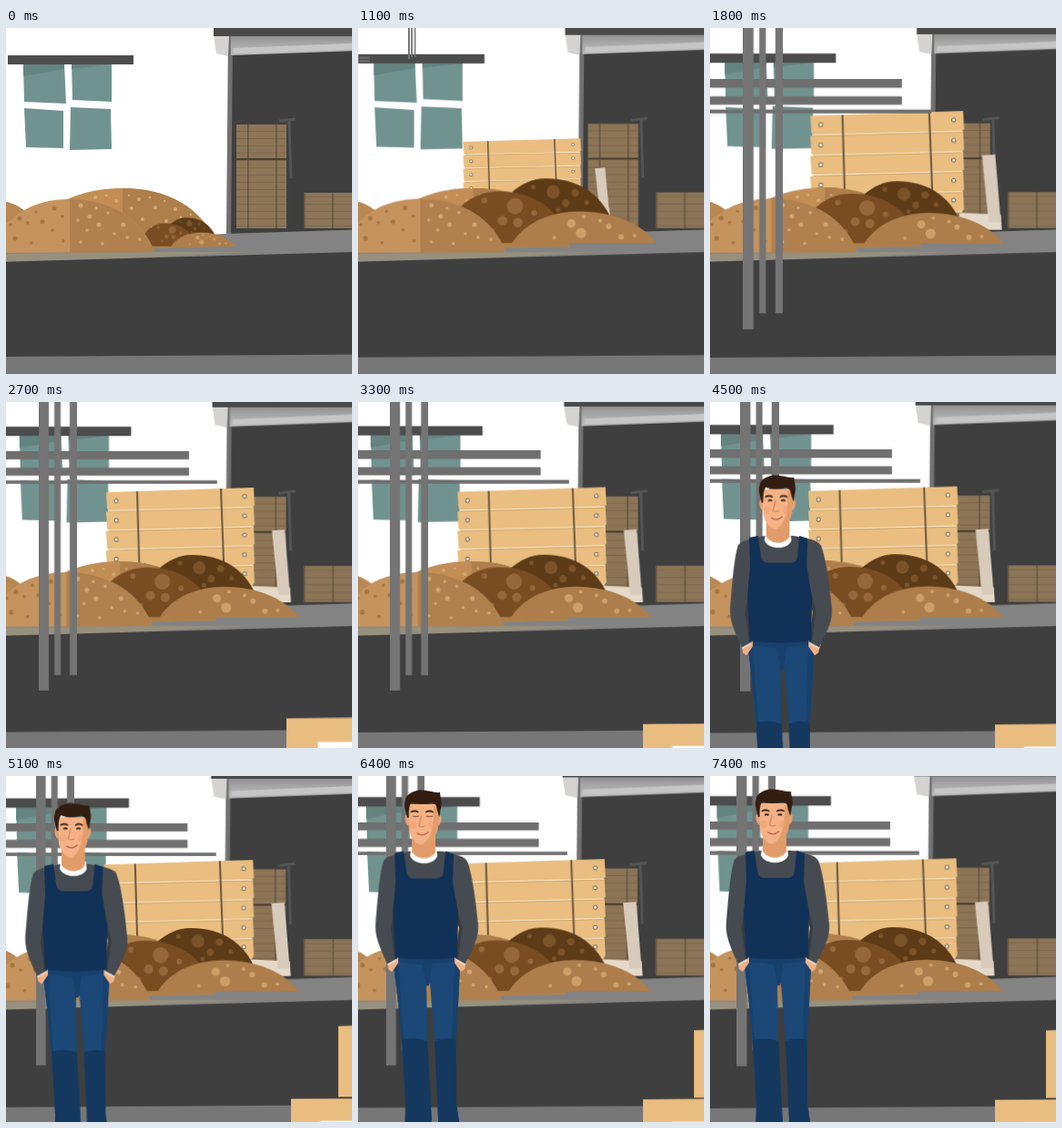
These frames come from a looping animation (380x380 px, 7.5 s). An HTML page without scripts:

```html
<!DOCTYPE html>
<html lang="en">
<head>
<meta charset="utf-8">
<title>Warehouse yard</title>
<style>
html, body { margin: 0; width: 100%; height: 100%; overflow: hidden; background: #fff; }
svg { display: block; width: 100vw; height: 100vh; }
.dots { fill: none; stroke-linecap: round; }
.anim { animation: 7.5s linear infinite; }
.zoom { transform-origin: 340px 250px; animation-name: zoom; }
.heaps { transform-origin: 190px 243px; animation-name: heaps; }
.planks { transform-origin: 129px 182px; animation-name: planks; }
.posts { transform-origin: 57px 0; animation-name: posts; }
.rails { transform-origin: 0 24px; animation-name: rails; }
.box1 { transform-origin: 376px 429px; animation-name: box1; }
.box2 { transform-origin: 430px 353px; animation-name: box2; }
.man { animation-name: rise; }
.open { animation-name: open; }
.shut { animation-name: shut; }
@keyframes zoom { to { transform: scale(1.0365); } }
@keyframes heaps {
  0% { transform: scale(.47); animation-timing-function: ease-out; }
  8% { transform: scale(1.08); animation-timing-function: ease-in-out; }
  14.67% { transform: scale(1.045); }
  24%, 100% { transform: none; }
}
@keyframes planks {
  0%, 12% { transform: scale(0); }
  14.67% { transform: scale(.8, .7); animation-timing-function: ease-out; }
  20% { transform: scale(1.06); animation-timing-function: ease-in-out; }
  30%, 100% { transform: none; }
}
@keyframes posts {
  0%, 13% { transform: scale(0); }
  14.67% { transform: scale(.2, .1); animation-timing-function: ease-out; }
  22% { transform: scale(1.05); animation-timing-function: ease-in-out; }
  32%, 100% { transform: none; }
}
@keyframes rails {
  0%, 13% { transform: scale(0); }
  14.67% { transform: scale(.05, .2); animation-timing-function: ease-out; }
  22% { transform: scale(1.05); animation-timing-function: ease-in-out; }
  32%, 100% { transform: none; }
}
@keyframes box1 {
  0%, 30.7% { transform: scale(0); animation-timing-function: ease-out; }
  36% { transform: scale(1.08); animation-timing-function: ease-in-out; }
  44%, 100% { transform: none; }
}
@keyframes box2 {
  0%, 62.7% { transform: scale(0); animation-timing-function: ease-out; }
  68% { transform: scale(1.06); animation-timing-function: ease-in-out; }
  75%, 100% { transform: none; }
}
@keyframes rise {
  0%, 44% { transform: translateY(382px); animation-timing-function: cubic-bezier(.333, 1, .667, 1); }
  79.6%, 100% { transform: none; }
}
@keyframes open { 0%, 84.5%, 87%, 100% { opacity: 1; } 84.6%, 86.9% { opacity: 0; } }
@keyframes shut { 0%, 84.5%, 87%, 100% { opacity: 0; } 84.6%, 86.9% { opacity: 1; } }
</style>
</head>
<body>
<svg viewBox="0 0 380 380" preserveAspectRatio="none">
<defs>
  <linearGradient id="eave" x2="0" y2="1">
    <stop offset="0" stop-color="#8e8e8e"/><stop offset=".4" stop-color="#a6a6a6"/><stop offset="1" stop-color="#bcbcbc"/>
  </linearGradient>
  <pattern id="crate" width="31" height="8" x="265" y="106" patternUnits="userSpaceOnUse">
    <path fill="#8c7557" d="M0 0h31v8H0z"/>
    <path fill="none" stroke="#79644a" stroke-width=".8" d="M0 7.5h31"/>
    <path fill="none" stroke="#66563f" stroke-width="1.6" d="M.8 0v8"/>
  </pattern>
  <g id="plank">
    <path fill="#e9be80" d="M110 99L272 94L273 113L270 117L113 120L111 117Z"/>
    <path fill="none" stroke="#f8e8cb" stroke-width="1.2" d="M112 119.5L271 115.5"/>
    <path fill="none" stroke="#c99a5c" stroke-width=".7" d="M113 120.4L270 116.6"/>
    <g fill="#fff" stroke="#80684a"><circle cx="121" cy="108.500" r="2"/><circle cx="262" cy="103.500" r="2"/></g>
  </g>
  <path id="mound" d="M-23 247C0 205 30 188 70 188C115 188 150 210 163 246Z"/>
  <path id="back" d="M40 204C70 182 100 176 128 176C175 176 215 195 233 240L40 244Z"/>
  <clipPath id="right"><path d="M70 170H180V250H70z"/></clipPath>
  <clipPath id="rightBack"><path d="M128 170H250V250H128z"/></clipPath>
</defs>

<g class="anim zoom">
  <!-- window -->
  <g fill="#71938f">
    <path d="M19 39H64L66 83L20 81Z"/><path d="M72 39H116V81L73 79Z"/>
    <path d="M20 88L63 91V132L22 131Z"/><path d="M71 87L115 89L116 133L70 134Z"/>
  </g>
  <path fill="#648480" d="M19 40H64V45L19 53ZM72 40H114L72 45Z"/>
  <path fill="#4c4c4c" d="M2 30H140V40H2Z"/>

  <!-- storehouse -->
  <path fill="#3f3f3f" d="M246 20H400V228H246Z"/>
  <path fill="#717171" d="M244 9H249L247 227H242Z"/>
  <path fill="#d5d3d1" d="M228 8H245L244 31L231 28Z"/>
  <path fill="url(#eave)" d="M247 8H400V24.500L247 30Z"/>
  <path fill="#c6c6c6" d="M250 22L400 16V23L250 28Z"/>
  <path fill="#494949" d="M228 -20H400V9H228Z"/>
  <path fill="none" stroke="#555" stroke-width="3" d="M300 102L318 100M311 102L313 165"/>
  <path fill="url(#crate)" d="M253 106H308V220H253ZM327 181H400V220H327Z"/>
  <path fill="#4b4030" d="M253 143H308V145H253Z"/>

  <!-- dock -->
  <path fill="#838383" d="M-10 242L240 226L400 221V250L-10 260Z"/>
  <path fill="#96907f" d="M-10 248L163 246L270 246L-10 260Z"/>
  <path fill="#777" d="M-10 350H400V400H-10Z"/>
  <path fill="#3f3f3f" d="M-10 257L400 245.500V358.500L-10 361Z"/>

  <!-- plank stack -->
  <g transform="translate(340 250) scale(.987) translate(-340 -250)">
    <g class="anim planks">
      <path fill="#e5d9c9" d="M268 202L312 204L313 220H268Z"/>
      <path fill="#d8cbbb" d="M292 141L306 140L312 212H299Z"/>
      <use href="#plank" y="85"/><use href="#plank" y="64"/><use href="#plank" y="42.500"/><use href="#plank" y="21.500"/><use href="#plank"/>
      <path fill="none" stroke="#6d5743" stroke-width="2" d="M144 98L147 202M236 95L240 200"/>
    </g>
  </g>

  <!-- soil -->
  <path fill="#b98751" d="M-20 190C0 188 14 194 24 204L-20 230Z"/>
  <use href="#back" fill="#c28e56"/>
  <use href="#back" fill="#ae7f4b" clip-path="url(#rightBack)"/>
  <g class="dots" stroke="#d6aa76">
    <path stroke-width="4" d="M98 186h0M121 190h0M146 188h0M164 197h0M186 199h0M150 210h0M176 212h0M138 198h0"/>
    <path stroke-width="2.500" d="M110 184h0M135 184h0M158 186h0M174 190h0M192 208h0M203 205h0M160 219h0M141 222h0"/>
  </g>
  <g class="anim heaps">
    <path fill="#5d3b17" d="M140 236C155 190 180 169 206 169C240 169 263 185 275 212L278 236Z"/>
    <g class="dots" stroke="#7a5329">
      <path stroke-width="14" d="M214 183h0"/><path stroke-width="8" d="M227 195h0M237 184h0"/>
      <path stroke-width="5" d="M193 178h0M249 194h0M219 202h0"/>
    </g>
    <path fill="#7a4c22" d="M98 236C106 198 132 182.500 157 182.500C185 182.500 207 194 217 209L200 236Z"/>
    <g class="dots" stroke="#95673b">
      <path stroke-width="17" d="M174 198h0"/><path stroke-width="10" d="M177 215h0M161 213h0"/>
      <path stroke-width="6" d="M142 192h0M194 205h0M150 224h0"/>
    </g>
    <path fill="#ad7e4b" d="M171 236.500C185 214 213 203.500 241 203.500C279 203.500 308 218 322 236.500Z"/>
    <g class="dots" stroke="#cda06a">
      <path stroke-width="11" d="M243 226h0"/><path stroke-width="9" d="M233 216h0"/>
      <path stroke-width="6" d="M272 219h0M285 230h0"/><path stroke-width="4" d="M246 209h0M263 213h0M299 229h0M215 231h0"/>
    </g>
  </g>
  <use href="#mound" fill="#c5935e"/>
  <use href="#mound" fill="#b0814e" clip-path="url(#right)"/>
  <g class="dots" stroke="#a87540">
    <path stroke-width="5" d="M40 213h0M53 198h0M15 209h0M10 231h0"/>
    <path stroke-width="3.500" d="M24 214h0M33 202h0M62 207h0M28 236h0M51 222h0M63 234h0M5 216h0"/>
  </g>
  <g class="dots" stroke="#d2a572">
    <path stroke-width="5" d="M92 207h0M102 216h0M129 216h0M82 195h0"/>
    <path stroke-width="3.500" d="M79 211h0M89 222h0M112 203h0M119 226h0M99 198h0M133 230h0M82 235h0M106 237h0M147 232h0"/>
  </g>

  <!-- steel frame -->
  <g transform="translate(340 250) scale(.987) translate(-340 -250)">
    <path class="anim rails" fill="#6f6f6f" d="M-20 54H201V63H-20ZM-20 72H201V81H-20ZM-20 86H232V90H-20Z"/>
    <path class="anim posts" fill="#747474" d="M36 -20H47V317H36ZM53 -20H60V300H53ZM70 -20H78V300H70Z"/>
  </g>

  <!-- cartons -->
  <g transform="translate(340 250) scale(.981) translate(-340 -250)">
    <g class="anim box1">
      <path fill="#e9bd80" d="M313 354L440 353V450H313Z"/>
      <path fill="#fff" d="M345 378H440V430H345Z"/>
    </g>
    <path class="anim box2" fill="#e9bd80" d="M369 279L450 276V352H369Z"/>
  </g>

  <!-- worker -->
  <g transform="translate(340 250) scale(.9657) translate(-340 -250)">
    <g class="anim man">
      <!-- trousers -->
      <path fill="#1c4877" d="M40 194H107L111 208L109 250L106 300L107 360L113 400H88L83 290L78 228H74L75 290L81 400H50L51 360L47 300L43 250L38 208Z"/>
      <path fill="#17406d" d="M40 198H108L107 203L80 206L77 230H74L70 207L43 204L49 290H47L43 250L38 208ZM111 208L105 203L102 290H106.500L109 250Z"/>
      <path fill="#15385f" d="M47 290Q61 286 75 291L81 400H50L51 360ZM83 291Q95 286 106.500 290L107 360L113 400H88Z"/>
      <!-- hands and sleeves -->
      <path fill="#f0b084" d="M30 200L43 198L43 205L36 215L32 212ZM119 200L105 198L105 205L112 215L116 212Z"/>
      <path fill="#e6d9cc" d="M30 203L41 199V203L32 208ZM119 203L107 199V203L116 208Z"/>
      <path fill="#464b51" d="M56 82C45 85 32 86 27 92C22 105 20 140 18 160C17 173 20 183 31 206L42 200L38 168L41 130H105L110 168L106 200L117 206C128 184 132 175 131 162C129 142 125 108 119 93C115 86 101 84 88 82Z"/>
      <path fill="#373c42" d="M40 132L42 150L39 168L42 199L39 201L35 168ZM105 132L104 150L110 166L106 199L109 201L113 166Z"/>
      <!-- neck and shirt -->
      <path fill="#fff" d="M57 79H85L86 87C83 98 60 98 56 87Z"/>
      <path fill="#e29c69" d="M58 60H84V83C79 92 64 92 58 83Z"/>
      <!-- bib -->
      <path fill="#123157" d="M39 84L49 82L52 104Q53 112 60 112H86Q92 112 93 104L95 82L104 85L103 116L109 150L108 199Q74 203 40 199L37 150L40 116Z"/>
      <!-- head -->
      <g transform="translate(5.500 0) scale(.91 1)">
        <path fill="#e9a273" d="M53 42C48 39 48 52 54 54ZM90 42C95 39 95 52 89 54Z"/>
        <path fill="#f4b286" d="M53 30H90L89 57C87 66 78 75 70 75C63 75 55 67 54 57Z"/>
        <path fill="#e39d6b" d="M84 32H90L89 57C87 66 78 75 70 75C79 69 85 60 84 32Z"/>
        <path fill="#321d11" d="M52 45C50 36 47 31 50 25C49 21 58 16 64 15C74 13 84 18 92 17C91 20 95 27 93 33L91 44L88 36C88 31 85 28 80 29C72 31 62 30 57 28C54 32 54 38 54 45Z"/>
        <path fill="none" stroke="#3a271c" stroke-width="1.800" stroke-linecap="round" d="M57 38.500Q61 36.500 65 38.500M75 38.500Q79 36.500 83 38.500"/>
        <path class="anim open" fill="none" stroke="#33231a" stroke-width="2" d="M60 43Q62.500 41.500 65 43M76 43Q78.500 41.500 81 43"/>
        <path class="anim shut" fill="none" stroke="#7b4d35" stroke-width="1.200" d="M58.500 43Q62 44.500 66 43M75 43Q79 44.500 83 43"/>
        <path fill="none" stroke="#cf8055" stroke-linecap="round" stroke-width="1.200" d="M69 43L66 54Q69 56 73 54"/>
        <path fill="none" stroke="#b65f45" stroke-linecap="round" stroke-width="1.300" d="M64 62Q71 66 77 61"/>
        <g fill="#ee9d70" opacity=".5"><circle cx="59" cy="53" r="4"/><circle cx="82" cy="53" r="4"/></g>
      </g>
    </g>
  </g>
</g>
</svg>
</body>
</html>
```
